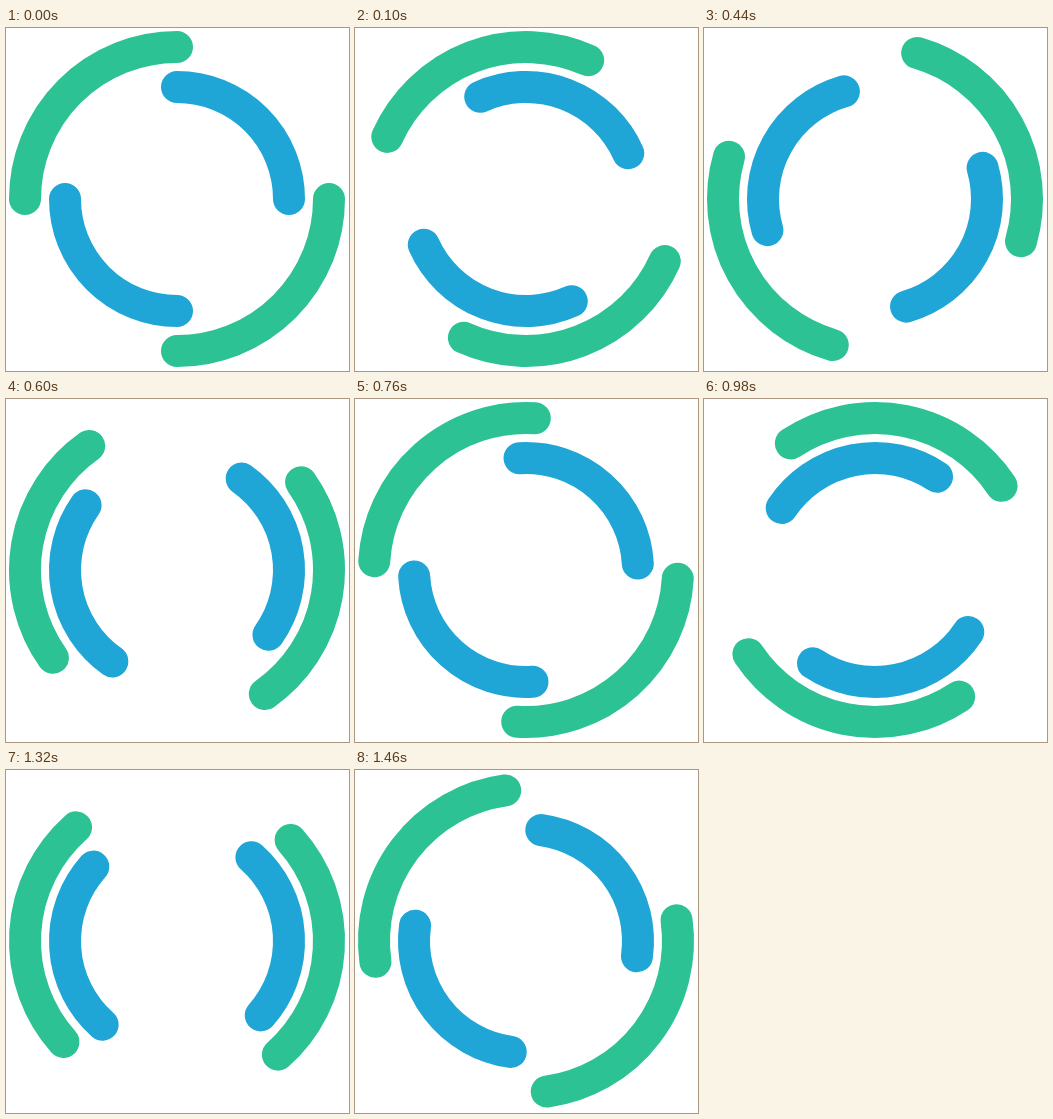
Recreate the animation shown at these times as an HTML page. Size 343 px wide and 343 px high, loop 1.48 s.

```html
<!DOCTYPE html>
<html lang="en">
<head>
<meta charset="utf-8">
<title>Double ring spinner</title>
<style>
  html, body { margin: 0; width: 100%; height: 100%; overflow: hidden; background: #fff; }
  svg { display: block; width: 100vw; height: 100vh; }
  path { fill: none; stroke-width: 32; stroke-linecap: round; }
</style>
</head>
<body>
<svg viewBox="0 0 343 343">
  <g transform="translate(171 171)">
    <path id="outer" stroke="#2cc293" d="M-152 0A152 152 0 0 1 0 -152M152 0A152 152 0 0 1 0 152"/>
    <path id="inner" stroke="#1fa5d6" d="M0 -112A112 112 0 0 1 112 0M0 112A112 112 0 0 1 -112 0"/>
  </g>
</svg>
<script>
  const LOOP = 1480;        // ms before the animation restarts
  const STEP = 20;          // ms per picture
  const TURN = 1000 / 0.67; // ms per full turn, slightly longer than the loop
  const outer = document.getElementById('outer');
  const inner = document.getElementById('inner');

  function draw(ms) {
    const t = Math.floor((ms % LOOP) / STEP) * STEP;
    const angle = 360 * t / TURN;
    outer.setAttribute('transform', `rotate(${angle})`);
    inner.setAttribute('transform', `rotate(${-angle})`);
  }

  const start = performance.now();
  function tick() {
    draw(performance.now() - start);
    requestAnimationFrame(tick);
  }
  draw(0);
  requestAnimationFrame(tick);
</script>
</body>
</html>
```
